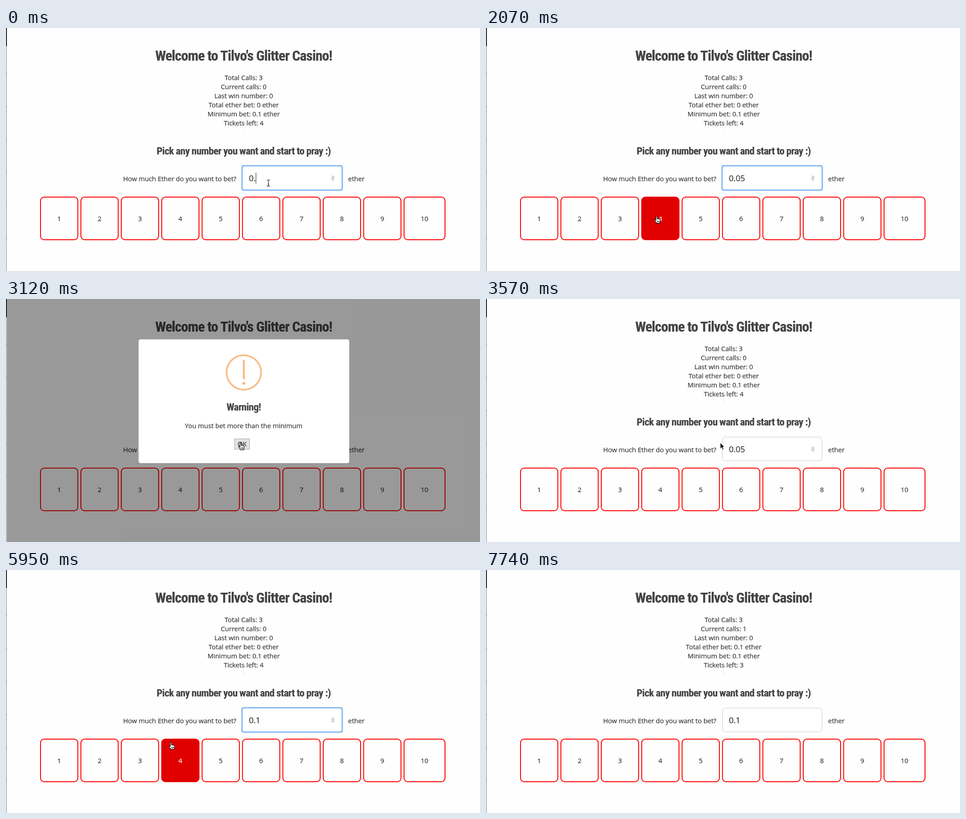
These frames come from a looping animation (1044 by 536 pixels, 8 s). An HTML page:

```html
<!DOCTYPE html>
<html lang="en">
<head>
<meta charset="utf-8">
<title>Virtual betting page</title>
<style>
  html, body { margin: 0; height: 100%; overflow: hidden; background: #fefefe; }
  svg { display: block; width: 100vw; height: 100vh; }
  text { font: 14.5px "Open Sans", sans-serif; fill: #333; stroke: #333; stroke-width: .2; white-space: pre; }
  .mid { text-anchor: middle; }
  .head { font: bold 22.95px "Roboto Condensed", Roboto, sans-serif; font-stretch: 75%; letter-spacing: -.03em; fill: #444; stroke: #444; }
  .title { font-size: 31.6px; }
  .value { font-size: 18px; }
  .box rect { fill: #fefefe; stroke: #f00; stroke-width: 2; }
  .box.hover rect { fill: #e10000; stroke: #e60000; }
  .box.hover text { fill: #fff; stroke: #fff; }
</style>
</head>
<body>
<svg viewBox="0 0 1044 536">
  <rect width="1044" height="536" fill="#fefefe"/>
  <text class="head title mid" x="523.5" y="71.5">Welcome to Tilvo's Glitter Casino!</text>
  <g id="stats"></g>
  <rect x="523" y="226.5" width="1" height="1.5" fill="#999"/>
  <text class="head mid" x="523.5" y="279">Pick any number you want and start to pray :)</text>
  <text x="258" y="337.5">How much Ether do you want to bet?</text>
  <text x="753.5" y="337.5">ether</text>

  <rect id="field" x="520.5" y="304.5" width="219.5" height="52.5" rx="7" fill="#fff" stroke="#ccc"/>
  <g id="focusRing" fill="none">
    <rect x="519.8" y="303.8" width="221" height="54" rx="3.5" stroke="#b5d5f8" stroke-width="3.4"/>
    <rect x="520" y="304" width="220.5" height="53.5" rx="3.5" stroke="#7fb5f2" stroke-width="2"/>
  </g>
  <g id="spinner">
    <rect x="716.5" y="325" width="7" height="12" rx="3.5" fill="#fff" stroke="#ccc" stroke-width=".8"/>
    <path d="M718 329.8L720 327L722 329.8ZM718 332.2L720 335L722 332.2Z" fill="#777"/>
  </g>
  <text id="value" class="value" x="535" y="338"></text>
  <rect id="caret" y="319" width="1" height="24" fill="#222"/>
  <g id="boxes"></g>

  <rect id="overlay" x="2" width="1042" height="536"/>
  <g id="modal">
    <rect x="292" y="89" width="464" height="273" rx="4.5" fill="#fff"/>
    <circle cx="523.8" cy="162" r="38" fill="none" stroke="#f8bb86" stroke-width="3.6"/>
    <rect x="521.6" y="134.5" width="4.4" height="43" rx="2" fill="#f8bb86"/>
    <circle cx="523.8" cy="186" r="3.2" fill="#f8bb86"/>
    <text class="head mid" x="523.5" y="245.5">Warning!</text>
    <text class="mid" x="523.5" y="285">You must bet more than the minimum</text>
    <rect x="503.5" y="308.5" width="33" height="23" fill="#e3e3e3" stroke="#a6a6a6"/>
    <text class="mid" x="520" y="325">OK</text>
  </g>

  <g id="edge"></g>
  <g id="cursor">
    <path id="arrow" d="M0 0V13.4L3 10.6L5.2 15.4L7.4 14.4L5.3 9.7H9.3Z" fill="#000" stroke="#fff" stroke-width=".9"/>
    <path id="hand" d="M-1.6 1.2C-1.6-.5 1-.5 1 1.2V6C2 5 3.5 5.4 3.7 6.5C5 6 6 6.5 6.2 7.5C7.5 7.2 8.2 8 8 9.5L7 13V15.6H-1V14L-4.6 9.6C-5 8-3.5 7.4-1.6 9.5ZM1.2 10.5V13.5M3.2 10.5V13.5M5.2 10.5V13.5" fill="#fff" stroke="#000" stroke-width="1.1" stroke-linejoin="round"/>
    <path id="beam" d="M-3.5-6Q0-6 0-4V6Q0 8-3.5 8M3.5-6Q0-6 0-4M0 6Q0 8 3.5 8M-1.7 3.5H1.7" fill="none" stroke="#111" stroke-width="1.1"/>
  </g>
</svg>
<script>
const LOOP = 8000, TICK = 148.7, LEAD = 20;
const $ = id => document.getElementById(id);
const show = (id, on) => { $(id).style.display = on ? '' : 'none'; };
const between = (n, from, to) => n >= from && n <= to;

function add(parent, tag, attrs, content = '') {
  const node = document.createElementNS('http://www.w3.org/2000/svg', tag);
  for (const name in attrs) node.setAttribute(name, attrs[name]);
  node.textContent = content;
  return parent.appendChild(node);
}

const boxes = Array.from({ length: 10 }, (_, i) => {
  const x = 76 + 88.97 * i, width = i === 9 ? 90.2 : 82.2;
  const node = add($('boxes'), 'g', { class: 'box' });
  add(node, 'rect', { x, y: 373, width, height: 94, rx: 8 });
  add(node, 'text', { x: x + width / 2, y: 425.5, class: 'mid' }, i + 1);
  return { node, x, width };
});

const statLines = Array.from({ length: 6 }, (_, i) =>
  add($('stats'), 'text', { x: 523.5, y: 115 + 19.9 * i, class: 'mid' }));

// Sliver of the window behind the page.
add($('edge'), 'rect', { width: 1.6, height: 536, fill: '#aaa' });
add($('edge'), 'rect', { width: 1.8, height: 40, fill: '#111' });
for (let y = 100; y < 536; y += 73) add($('edge'), 'rect', { y: y - .5, width: 1.6, height: 1, fill: '#555' });

// Pointer waypoints: tick, x, y
const path = [
  [0, 578, 341], [2, 578, 341], [4, 742, 308], [5, 725, 330], [8, 483, 361], [10, 562, 400],
  [11, 545, 410], [14, 376, 415], [16, 376, 415], [21, 517, 317], [24, 516, 317], [25, 516, 317],
  [28, 590, 336], [29, 599, 336], [37, 599, 336], [43, 128, 424], [45, 128, 424], [46, 131, 424],
  [47, 131, 424], [49, 160, 475], [54, 160, 475]
];
// Typed value: starting tick, text
const typing = [[0, '0.'], [1, '0.0'], [3, '0.05'], [32, '0.0'], [33, '0.'], [36, '0.1']];
const caretSpans = [[0, 6], [11, 13], [28, 31], [36, 38]];

function pointerAt(tick) {
  const i = path.findIndex(p => p[0] > tick);
  const [t0, x0, y0] = path[i - 1], [t1, x1, y1] = path[i];
  const k = (tick - t0) / (t1 - t0);
  return [x0 + (x1 - x0) * k, y0 + (y1 - y0) * k];
}

function drawStats(placed) {
  const lines = [
    'Total Calls: 3', `Current calls: ${placed ? 1 : 0}`, 'Last win number: 0',
    `Total ether bet: ${placed ? '0.1' : 0} ether`, 'Minimum bet: 0.1 ether', `Tickets left: ${placed ? 3 : 4}`
  ];
  lines.forEach((line, i) => { statLines[i].textContent = line; });
}

function drawField(tick) {
  const focused = !between(tick, 16, 27) && tick < 47;
  show('focusRing', focused);
  show('spinner', tick < 47);
  $('value').textContent = typing.filter(([start]) => start <= tick).pop()[1];
  $('caret').setAttribute('x', 535 + $('value').getComputedTextLength());
  show('caret', focused && caretSpans.some(([a, b]) => between(tick, a, b)));
}

function drawModal(tick, open) {
  show('overlay', open);
  show('modal', open);
  if (!open) return;
  const step = Math.min(tick - 16, 2);
  $('overlay').setAttribute('fill-opacity', [.12, .34, .4][step]);
  $('modal').setAttribute('opacity', [.4, 1, 1][step]);
  $('modal').setAttribute('transform',
    `translate(523.8 225.5) scale(${[.82, 1.03, 1][step]}) translate(-523.8 -225.5)`);
}

function drawPointer(tick, modalOpen) {
  const [x, y] = pointerAt(tick);
  const visible = tick < 50;
  let overBox = false;
  for (const box of boxes) {
    const hover = visible && !modalOpen && between(x, box.x, box.x + box.width) && between(y, 373, 467);
    box.node.classList.toggle('hover', hover);
    overBox = overBox || hover;
  }
  const overOk = modalOpen && between(x, 503, 537) && between(y, 308, 332);
  const overField = !modalOpen && between(x, 520, 740) && between(y, 304, 357);
  show('hand', overBox || overOk);
  show('beam', overField);
  show('arrow', !overBox && !overOk && !overField);
  show('cursor', visible);
  $('cursor').setAttribute('transform', `translate(${x} ${y})`);
}

function draw(time) {
  const tick = Math.floor((time % LOOP + LEAD) / TICK);
  const modalOpen = between(tick, 16, 23);
  drawStats(tick >= 51);
  drawField(tick);
  drawModal(tick, modalOpen);
  drawPointer(tick, modalOpen);
}

const start = performance.now();
function loop() {
  draw(performance.now() - start);
  requestAnimationFrame(loop);
}
loop();
</script>
</body>
</html>
```
